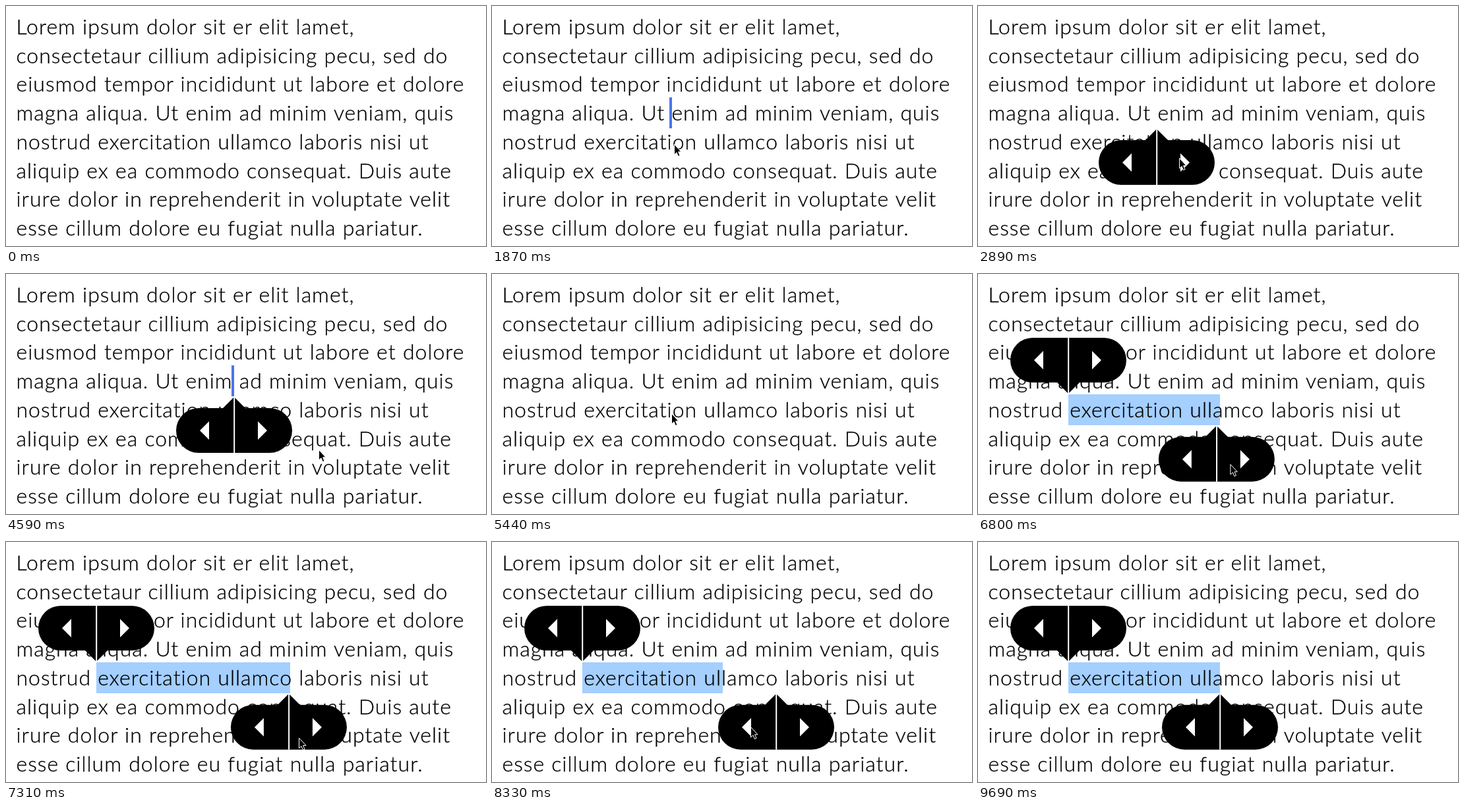
Animation of 728x365 px, one loop 9.86 s. Source, as an HTML page:

```html
<!DOCTYPE html>
<html lang="la">
<head>
<meta charset="utf-8">
<title>Text caret handles</title>
<style>
  html, body { margin: 0; width: 100%; height: 100%; overflow: hidden; background: #fff; }
  svg { display: block; width: 728px; height: 365px; }
  text {
    font: 300 32px Lato, "Open Sans", sans-serif;
    letter-spacing: 1px; word-spacing: .5px;
    fill: #000; stroke: #000; stroke-width: .3px;
  }
</style>
</head>
<body>
<svg viewBox="0 0 728 365">
  <defs>
    <g id="handle">
      <path d="M0 0L18 18H-18Z"/>
      <rect x="-88" y="17" width="176" height="68" rx="34"/>
      <path fill="#fff" d="M-52 51L-38 37V65ZM50 51L36 37V65ZM-.8 0H1.2V85H-.8Z"/>
    </g>
  </defs>
  <rect id="range" x="137" y="183" height="47" fill="#a4cfff"/>
  <g id="copy"></g>
  <rect id="caret" y="139" width="4" height="47" fill="#4a75ec"/>
  <use id="startGrip" href="#handle" transform="translate(137 182) scale(1 -1)"/>
  <use id="grip" href="#handle"/>
  <path id="cursor" d="M.5 .5V16L4 12.8L6.4 18.6L9 17.5L6.6 11.8H11Z" stroke="#fff" stroke-linejoin="round"/>
</svg>
<script>
const LOOP = 9860, TICK = 170, FIRST_BASE = 43, PITCH = 43.7;
const $ = id => document.getElementById(id);

const copy = `Lorem ipsum dolor sit er elit lamet,
consectetaur cillium adipisicing pecu, sed do
eiusmod tempor incididunt ut labore et dolore
magna aliqua. Ut enim ad minim veniam, quis
nostrud exercitation ullamco laboris nisi ut
aliquip ex ea commodo consequat. Duis aute
irure dolor in reprehenderit in voluptate velit
esse cillum dolore eu fugiat nulla pariatur.`;

copy.split('\n').forEach((line, row) => {
  const text = document.createElementNS('http://www.w3.org/2000/svg', 'text');
  text.setAttribute('x', 15.5);
  text.setAttribute('y', FIRST_BASE + row * PITCH);
  text.textContent = line;
  $('copy').append(text);
});

// Letter edges the caret and the selection snap to.
const caretStops = [269, 288, 306, 315, 342];
const rangeStops = [307, 316, 335, 343, 350, 367, 396, 412, 431];

// Pointer path: [tick, x, y]
const path = [
  [5, 311, 237], [8, 254, 172], [9, 276, 210], [13, 276, 210],
  [17, 305, 231], [24, 305, 231], [27, 474, 267], [30, 272, 212],
  [33, 272, 212], [37, 308, 274], [42, 432, 299], [45, 468, 295],
  [47, 392, 281], [49, 392, 281], [52, 451, 297]
];

const clamp = (v, lo, hi) => Math.min(hi, Math.max(lo, v));

function slide(tick, start, length, from, to) {
  const p = clamp((tick - start) / length, 0, 1);
  return from + (to - from) * p * p * (3 - 2 * p);
}

function pointer(tick) {
  const next = path.findIndex(key => key[0] > tick);
  if (next === 0 || tick > path.at(-1)[0]) return null;
  if (next < 0) return path.at(-1).slice(1);
  const [t0, x0, y0] = path[next - 1], [t1, x1, y1] = path[next];
  const p = (tick - t0) / (t1 - t0);
  return [x0 + (x1 - x0) * p, y0 + (y1 - y0) * p];
}

function caretX(tick) {
  const blinkOn = tick > 17 || (tick - 9) % 5 < 3;
  if (tick < 9 || tick >= 32 || !blinkOn) return null;
  return caretStops[clamp(Math.floor((tick - 16) / 1.5), 0, 4)];
}

function gripAt(tick) {
  if (tick < 14 || tick === 32) return null;
  if (tick < 32) return [slide(tick, 24, 3, 271, 346), 187];
  const x = tick < 55 ? slide(tick, 37, 6.5, 307, 431) : slide(tick, 55, 2, 431, 367);
  return [x, 187 + PITCH];
}

// Follows the dragged grip, then steps back letter by letter and once forward.
function rangeEnd(tick) {
  if (tick < 33) return null;
  if (tick > 50) return rangeStops[5];
  if (tick > 45) return rangeStops[Math.max(4, 53 - tick)];
  const [x] = gripAt(tick);
  return rangeStops.reduce((a, b) => Math.abs(b - x) < Math.abs(a - x) ? b : a);
}

function show(id, on) {
  $(id).style.display = on ? '' : 'none';
}

function place(id, spot) {
  show(id, spot);
  if (spot) $(id).setAttribute('transform', `translate(${spot})`);
}

function draw(tick) {
  place('cursor', pointer(tick));
  place('grip', gripAt(tick));

  const bar = caretX(tick);
  show('caret', bar);
  if (bar) $('caret').setAttribute('x', bar);

  const end = rangeEnd(tick);
  show('range', end);
  show('startGrip', end);
  if (end) $('range').setAttribute('width', end - 137);
}

const begun = performance.now();
function run() {
  draw(Math.floor((performance.now() - begun) % LOOP / TICK));
  requestAnimationFrame(run);
}
run();
</script>
</body>
</html>
```
